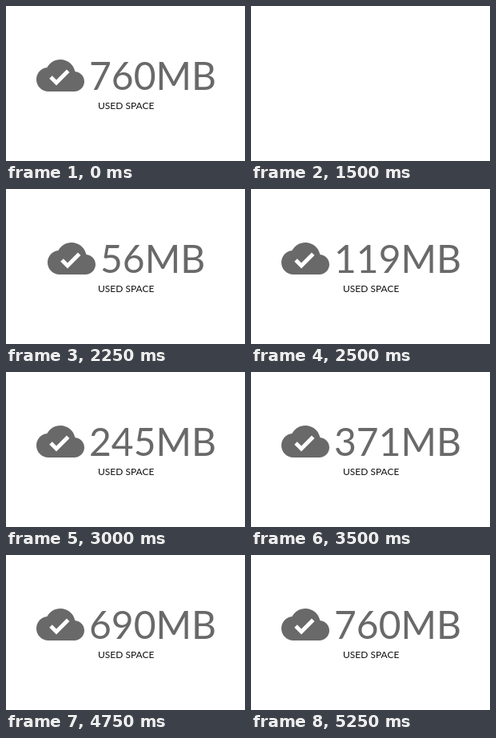
Recreate the animation shown at these times as an HTML page. Size 299 by 194 pixels, loop 6 s.

```html
<!DOCTYPE html>
<html lang="en">
<head>
<meta charset="utf-8">
<title>Used space</title>
<style>
  html, body { margin: 0; width: 100%; height: 100%; overflow: hidden; background: #fff; }
  svg { display: block; font-family: Lato, sans-serif; }
</style>
</head>
<body>
<svg width="299" height="194" viewBox="0 0 299 194">
  <g id="widget">
    <g id="row" fill="#696969">
      <path transform="translate(0 57) scale(2.5)" d="M19.35 10.04C18.67 6.59 15.64 4 12 4 9.11 4 6.6 5.64 5.35 8.04 2.34 8.36 0 10.91 0 14c0 3.31 2.69 6 6 6h13c2.76 0 5-2.24 5-5 0-2.64-2.05-4.78-4.65-4.96zM10 17l-3.5-3.5 1.41-1.41L10 14.17 15.18 9l1.41 1.41z"/>
      <rect id="placeholder" x="66" y="65" width="135" height="45" rx="3" fill="#e1e1e1"/>
      <text id="amount" x="66" y="105" font-size="48"></text>
    </g>
    <text x="115" y="129" font-size="12" fill="#111">USED SPACE</text>
  </g>
</svg>
<script>
  const LOOP = 6000, HIDE = 1500, LOAD = 2000, COUNT = 2250, STEP = 250;
  const counts = [56, 119, 182, 245, 308, 371, 435, 500, 563, 627, 690, 754, 760];
  const [widget, row, placeholder, amount] =
    ['widget', 'row', 'placeholder', 'amount'].map(id => document.getElementById(id));

  const show = (element, visible) =>
    element.setAttribute('visibility', visible ? 'inherit' : 'hidden');

  function valueAt(time) {
    if (time < HIDE) return counts.at(-1);
    const step = Math.max(0, Math.floor((time - COUNT) / STEP));
    return counts[Math.min(step, counts.length - 1)];
  }

  function draw(now) {
    const time = now % LOOP;
    const loading = time >= LOAD && time < COUNT;
    const value = valueAt(time);
    // The row stays centred, so its left edge depends on its content.
    const left = loading ? 50 : value < 100 ? 52 : 38;
    row.setAttribute('transform', `translate(${left} 0)`);
    amount.textContent = `${value}MB`;
    show(widget, time < HIDE || time >= LOAD);
    show(placeholder, loading);
    show(amount, !loading);
  }

  let start;
  function tick(now) {
    start ??= now;
    draw(now - start);
    requestAnimationFrame(tick);
  }
  draw(0);
  requestAnimationFrame(tick);
</script>
</body>
</html>
```
